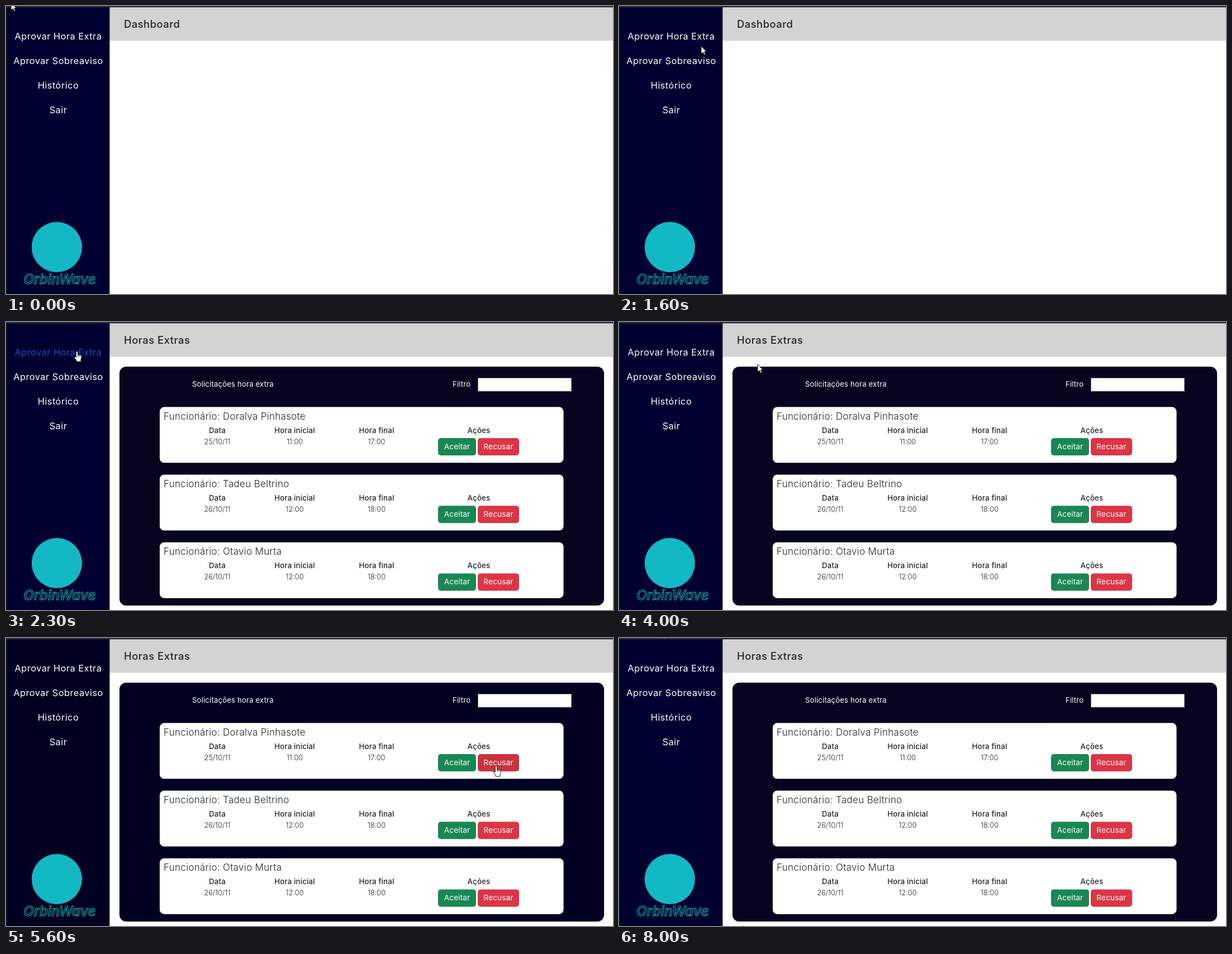
Write an HTML page that moves like this. It is 1086x516 px and loops after 8200 ms.

```html
<!DOCTYPE html>
<html lang="pt">
<head>
<meta charset="utf-8">
<title>Horas Extras</title>
<style>
  html, body { margin: 0; width: 100%; height: 100%; overflow: hidden; background: #fefefe; }
  svg { display: block; width: 1086px; height: 516px; font-family: Inter, "Noto Sans", sans-serif; }
  .mid { text-anchor: middle; }
  .menu { font-size: 16.4px; font-weight: 400; fill: #fff; letter-spacing: .45px; }
  .title { font-size: 18.4px; font-weight: 500; fill: #212529; letter-spacing: .5px; }
  .label { font-size: 13.2px; font-weight: 400; fill: #fff; letter-spacing: .15px; }
  .name { font-size: 17px; font-weight: 300; fill: #212529; letter-spacing: .3px; }
  .head { font-size: 13.3px; font-weight: 500; fill: #212529; letter-spacing: .15px; }
  .value { font-size: 12.7px; font-weight: 300; fill: #212529; }
  .button { font-size: 13.7px; font-weight: 400; fill: #fff; letter-spacing: .1px; }
  .brand { font-size: 24.5px; font-weight: 500; font-style: italic; fill: none; stroke: #14c4b2; }
  .status { font: 11.5px "Open Sans", sans-serif; fill: #3c4056; }
</style>
</head>
<body>
<svg viewBox="0 0 1086 516">
  <rect width="1086" height="516" fill="#fefefe"/>
  <rect x="185" y="2" width="901" height="60.3" fill="#d3d3d3"/>
  <rect id="side" x="1" width="184.4" height="516"/>
  <rect width="2" height="516" fill="#14171d"/>
  <rect width="1086" height="2.4" fill="#292d38"/>
  <text id="title" class="title" x="211" y="39"></text>

  <g class="menu mid">
    <text id="link" x="93.5" y="60">Aprovar Hora Extra</text>
    <text x="93.5" y="104">Aprovar Sobreaviso</text>
    <text x="93.5" y="148">Histórico</text>
    <text x="93.5" y="192">Sair</text>
  </g>
  <circle cx="91" cy="432" r="45" fill="#12b8c4"/>
  <text class="brand mid" x="96" y="498">OrbinWave</text>

  <g id="status" opacity=".45">
    <rect y="494" width="116" height="22" fill="#e2e2ea"/>
    <text class="status" x="8" y="510">localhost:3000/gestor</text>
  </g>

  <g id="page">
    <rect id="panel" x="203" y="80" width="867" height="428" rx="12"/>
    <text class="label" x="333" y="116">Solicitações hora extra</text>
    <text class="label" x="799" y="116">Filtro</text>
    <rect x="844.5" y="100.5" width="167" height="23.5" fill="#fff" stroke="#858585"/>
    <g id="rows"></g>
  </g>

  <g id="cursor" stroke="#000" fill="#fff" stroke-width=".9" stroke-linejoin="round">
    <path id="arrow" d="M0 0V13.6L3.2 10.8 5.4 15.6 7.6 14.6 5.5 9.9H9.6Z"/>
    <path id="hand" d="M-1.6 1Q0-1 1.6 1V6.5L6 7.6Q8.6 8.3 8.2 11.5L7 15.5V19H-1V17L-5 11.5Q-4.8 9-2.6 10.5L-1.6 11.4ZM1.6 7V10M4 8V10.5"/>
    <path id="beam" d="M-3-8H3M0-8V8M-3 8H3" stroke="#222"/>
  </g>
</svg>
<script>
const LOOP = 8200, STEP = 100;
const $ = id => document.getElementById(id);

// time, x, y, pointer shape
const moves = [
  [0, 9, -6, 'arrow'], [100, 9, -6, 'arrow'], [300, 381, 144, 'arrow'],
  [900, 381, 144, 'arrow'], [1200, 290, 116, 'arrow'], [1600, 147, 72, 'arrow'],
  [1800, 147, 72, 'arrow'], [2000, 136, 60, 'hand'], [2200, 127, 52, 'hand'],
  [2800, 127, 52, 'hand'], [2900, 246, 75, 'arrow'], [3900, 246, 75, 'arrow'],
  [4000, 248, 76, 'arrow'], [4200, 388, 207, 'beam'], [4300, 388, 207, 'beam'],
  [4400, 600, 200, 'arrow'], [4500, 774, 187, 'arrow'], [4600, 774, 187, 'arrow'],
  [4700, 796, 212, 'hand'], [4900, 807, 220, 'hand'], [5200, 807, 220, 'hand'],
  [5600, 877, 229, 'hand'], [6600, 877, 229, 'hand'], [6700, 700, 235, 'arrow'],
  [6900, 407, 240, 'arrow'], [7100, 407, 240, 'arrow'], [7300, 201, 139, 'arrow'],
  [7400, 201, 139, 'arrow'], [7500, 150, 74, 'arrow'], [7600, 100, 48, 'hand'],
  [7700, 74, -14, 'arrow'], [7800, 74, -14, 'arrow'], [8000, 75, -14, 'arrow']
];

const requests = [
  ['Doralva Pinhasote', '25/10/11', '11:00', '17:00'],
  ['Tadeu Beltrino', '26/10/11', '12:00', '18:00'],
  ['Otavio Murta', '26/10/11', '12:00', '18:00']
];

const text = (cls, x, y, s) => `<text class="${cls}" x="${x}" y="${y}">${s}</text>`;
const column = (x, head, value) => text('head mid', x, 199, head) + text('value mid', x, 219, value);
const button = (x, w, color, s) =>
  `<rect x="${x}" y="208" width="${w}" height="31" rx="5" fill="${color}"/>` +
  text('button mid', x + w / 2, 228, s);

$('rows').innerHTML = requests.map(([name, date, start, end], i) =>
  `<g transform="translate(0 ${i * 121.2})">
    <rect x="275" y="152.3" width="722.5" height="100" rx="8" fill="#fff"/>` +
    text('name', 282, 175, 'Funcionário: ' + name) +
    column(378, 'Data', date) + column(516.5, 'Hora inicial', start) + column(663, 'Hora final', end) +
    text('head mid', 846, 199, 'Ações') +
    button(773, 68, '#198754', 'Aceitar') + button(844, 74, '#dc3545', 'Recusar') +
  '</g>').join('');
const [, accept, refuse] = $('rows').firstElementChild.querySelectorAll('rect');

const clamp = v => Math.max(0, Math.min(1, v));
const blend = (a, b, k) => `rgb(${a.map((v, i) => Math.round(v + (b[i] - v) * k))})`;
// eases in from one time and out from another
const hover = (t, from, to) => clamp((t - from) / 200) * (1 - clamp((t - to) / 200));
const between = (t, a, b) => t >= a && t < b;
const show = (id, on) => $(id).setAttribute('visibility', on ? 'visible' : 'hidden');

function pointer(t) {
  const i = moves.findLastIndex(m => m[0] <= t);
  const a = moves[i], b = moves[i + 1] || a;
  const k = b === a ? 0 : (t - a[0]) / (b[0] - a[0]);
  return [a[1] + (b[1] - a[1]) * k, a[2] + (b[2] - a[2]) * k, a[3]];
}

function draw(now) {
  const t = Math.floor((now % LOOP) / STEP) * STEP;
  const listed = t >= 2300, dim = between(t, 5400, 6800);
  const [x, y, shape] = pointer(t);

  $('cursor').setAttribute('transform', `translate(${x} ${y})`);
  for (const id of ['arrow', 'hand', 'beam']) show(id, id === shape);

  show('page', listed);
  show('status', between(t, 2200, 2300));
  $('title').textContent = listed ? 'Horas Extras' : 'Dashboard';
  $('link').style.fill = between(t, 2000, 2900) || between(t, 7600, 7700) ? '#0d50c4' : '#fff';
  $('side').setAttribute('fill', dim ? '#020022' : '#000030');
  $('panel').setAttribute('fill', dim ? '#020022' : '#070420');
  accept.setAttribute('fill', blend([25, 135, 84], [21, 115, 71], hover(t, 4600, 5300)));
  refuse.setAttribute('fill', blend([220, 53, 69], [187, 45, 59], hover(t, 5500, 6600)));
}

const origin = performance.now();
function tick() {
  draw(performance.now() - origin);
  requestAnimationFrame(tick);
}
tick();
</script>
</body>
</html>
```
